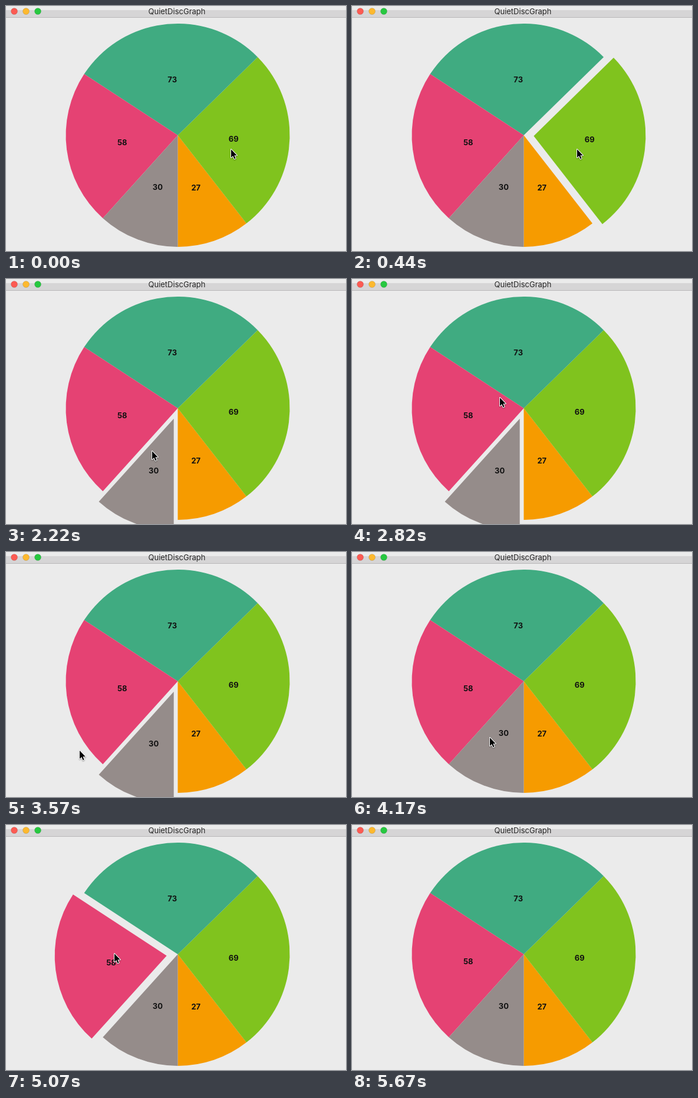
Recreate the animation shown at these times as an HTML page with a canvas. Size 577 by 417 pixels, loop 5970 ms.

```html
<!DOCTYPE html>
<html lang="en">
<head>
<meta charset="utf-8">
<title>QuietDiscGraph</title>
<style>
  html, body { margin: 0; height: 100%; overflow: hidden; background: #ebebeb; }
  canvas { display: block; }
</style>
</head>
<body>
<canvas width="577" height="417"></canvas>
<script>
const ctx = document.querySelector('canvas').getContext('2d');
const LOOP = 5970, START = 430, TICK = 149;
const CX = 291.5, CY = 220, R = 190, SHIFT = 19, TAU = 2 * Math.PI;

// open and close are click times, counted in ticks
const slices = [
  { value: 27, color: '#f69b00' },
  { value: 69, color: '#80c31e', open: -0.67, close: 9.33 },
  { value: 73, color: '#40ab81' },
  { value: 58, color: '#e54273', open: 28.33, close: 31.33 },
  { value: 30, color: '#958c8a', open: 9.33, close: 22.6 }
];
const total = slices.reduce((sum, s) => sum + s.value, 0);

// pointer trips between resting places, the third one with a swing to both sides
const home = { x: 381, y: 243 };
const trips = [
  { from: 2, to: 6, x: 247, y: 303 },
  { from: 11, to: 16, x: 250, y: 201 },
  { from: 16, to: 23, x: 233, y: 315, swing: 115 },
  { from: 25, to: 28, x: 183, y: 218 },
  { from: 32, to: 35, x: 680, y: 480 }
];
const arrow = new Path2D('M1 1V15L4.2 12 6.6 17.3 8.6 16.4 6.4 11.2H10.8Z');

const progress = (k, from, to) => Math.min(1, Math.max(0, (k - from) / (to - from)));
const easeOut = p => p * (2 - p);
const easeInOut = p => p * p * (3 - 2 * p);

function pointerAt(k) {
  let { x, y } = home;
  for (const trip of trips) {
    const p = progress(k, trip.from, trip.to), e = easeInOut(p);
    const sway = (trip.swing || 0) * Math.sin(TAU * p);
    x += (trip.x - x) * e + sway;
    y += (trip.y - y) * e - sway * 0.4;
    if (p < 1) break;
  }
  return [Math.round(x), Math.round(y)];
}

function text(str, x, y, weight) {
  ctx.font = `${weight} 13px Inter, "Liberation Sans", sans-serif`;
  ctx.fillText(str, x, y);
}

function bar(color, y, height) {
  ctx.fillStyle = color;
  ctx.fillRect(0, y, 577, height);
}

function drawWindow() {
  bar('#ebebeb', 0, 417);
  bar('#d6d5d6', 7, 12);
  bar('#b8b7b8', 19, 1);
  ['#fc5b53', '#fdb92f', '#27c840'].forEach((color, i) => {
    ctx.beginPath();
    ctx.arc(14 + 20 * i, 9, 5.5, 0, TAU);
    ctx.fillStyle = color;
    ctx.fill();
    ctx.strokeStyle = 'rgba(0,0,0,.12)';
    ctx.stroke();
  });
  ctx.fillStyle = '#262626';
  text('QuietDiscGraph', 290, 14, 400);
}

function drawPie(k) {
  let start = TAU / 4;
  for (const { value, color, open, close } of slices) {
    const end = start - value / total * TAU;
    const mid = (start + end) / 2, dx = Math.cos(mid), dy = Math.sin(mid);
    const slide = click => easeOut(progress(k, click, click + 1));
    const out = open === undefined ? 0 : SHIFT * (slide(open) - slide(close));
    const x = CX + out * dx, y = CY + out * dy;
    ctx.beginPath();
    ctx.moveTo(x, y);
    ctx.arc(x, y, R, start, end, true);
    ctx.fillStyle = color;
    ctx.fill();
    ctx.fillStyle = '#111';
    text(value, x + R / 2 * dx, y + R / 2 * dy + 4.5, 700);
    start = end;
  }
}

function drawPointer(k) {
  ctx.save();
  ctx.translate(...pointerAt(k));
  ctx.lineJoin = 'round';
  ctx.lineWidth = 2;
  ctx.strokeStyle = '#fff';
  ctx.shadowColor = 'rgba(0,0,0,.4)';
  ctx.shadowBlur = 2;
  ctx.shadowOffsetY = 1;
  ctx.stroke(arrow);
  ctx.shadowColor = 'transparent';
  ctx.fillStyle = '#000';
  ctx.fill(arrow);
  ctx.restore();
}

// The picture only advances once per tick
function frame() {
  const k = Math.floor((performance.now() % LOOP - START) / TICK);
  ctx.textAlign = 'center';
  drawWindow();
  drawPie(k);
  drawPointer(k);
  requestAnimationFrame(frame);
}
frame();
</script>
</body>
</html>
```
